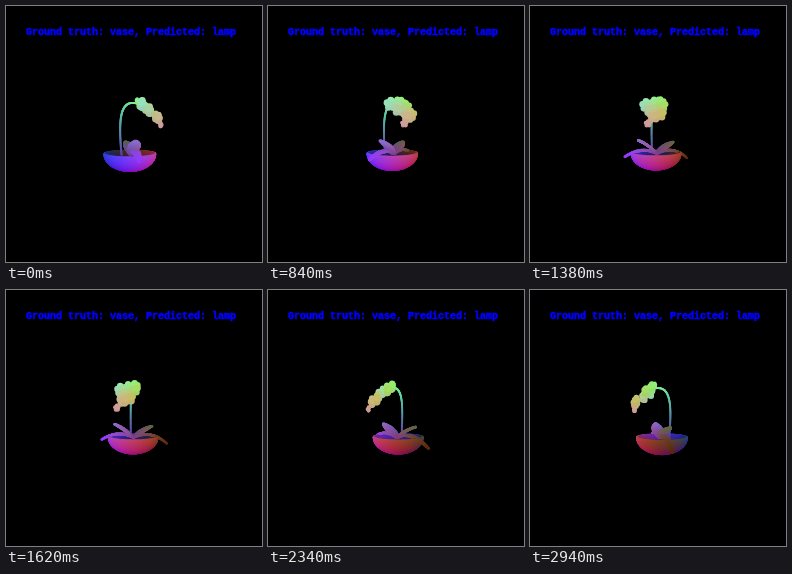
Write an HTML page with a canvas that moves like this. It is 256 px wide and 256 px high and loops after 3000 ms.

```html
<!DOCTYPE html>
<html lang="en">
<head>
<meta charset="utf-8">
<style>
html, body { margin: 0; width: 100%; height: 100%; overflow: hidden; background: #000; }
canvas { position: absolute; left: 0; top: 0; }
p {
  position: absolute; left: 20px; top: 21px; margin: 0; white-space: pre;
  font: bold 10px/12px "Liberation Mono", "Courier New", monospace;
  color: #00f; -webkit-text-stroke: 0.5px #00f;
}
</style>
</head>
<body>
<canvas id="stage" width="256" height="256"></canvas>
<p>Ground truth: vase, Predicted: lamp</p>
<script>
const ctx = document.getElementById('stage').getContext('2d');
const CENTER = 128, CAMERA = 140, STEP = 60, STEPS = 50;
const RAD = Math.PI / 180;
const dots = [];

// Model space: x right, z towards the viewer, y down the stage. Colour follows position.
function dot(x, y, z, r, shade = 1) {
  const channel = v => Math.round(255 * shade * Math.min(1, Math.max(0, v)));
  const red = 0.5 + 0.0118 * (x + 0.09 * z);
  const green = (166 - y) / 75;
  const blue = 0.52 + 0.0165 * (0.97 * z - 0.26 * x);
  dots.push({ x, y, z, r, fill: `rgb(${[red, green, blue].map(channel)})` });
}

function bezier(points, t) {
  while (points.length > 1) {
    points = points.slice(1).map((p, i) => p.map((v, k) => points[i][k] * (1 - t) + v * t));
  }
  return points[0];
}

function bowl(radius, depth, shade) {
  for (let t = 0; t <= 90; t += 2.5) {
    const r = radius * Math.cos(t * RAD);
    const n = Math.max(1, Math.ceil(r * 5.5));
    for (let i = 0; i < n; i++) {
      const a = i / n * 2 * Math.PI;
      dot(r * Math.cos(a) - 4, 147 + depth * Math.sin(t * RAD), r * Math.sin(a) + 1.4, 0.85, shade);
    }
  }
}

function stem() {
  const path = [[-12, 148, 5], [-15, 115, 6], [-14, 94, 5], [3, 98, 2]];
  for (let t = 0; t <= 1; t += 0.01) dot(...bezier(path, t), 1.1 - 0.1 * t);
}

function leaf(angle, reach, tipY, bendY, halfWidth) {
  const c = Math.cos(angle * RAD), s = Math.sin(angle * RAD);
  const path = [[-3, 148, 1], [reach * c * 0.5, bendY, reach * s * 0.5], [reach * c, tipY, reach * s]];
  for (let t = 0; t <= 1; t += 0.025) {
    const [x, y, z] = bezier(path, t);
    const w = halfWidth * Math.sin(Math.PI * (0.12 + 0.85 * t));
    for (let d = -w; d <= w; d += 0.8) dot(x - d * s, y, z + d * c, 1.25);
  }
}

// A blossom sits at distance out along the spray and side across it.
function blossom(out, side, y, size) {
  const c = Math.cos(25 * RAD), s = Math.sin(25 * RAD);
  const ball = (o, d, h, r) => dot(o * c + d * s, h, o * s - d * c, r);
  ball(out + 1, side, y, size * 0.5);
  for (let i = 0; i < 5; i++) {
    const a = (i * 72 - 90) * RAD;
    for (let k = 0.25; k <= 0.56; k += 0.15) {
      ball(out, side + size * k * Math.cos(a), y + size * k * Math.sin(a), size * 0.48);
    }
  }
}

bowl(24.9, 16.5, 1);
bowl(24, 15.5, 0.7);
stem();
leaf(86, 20, 134, 138, 5.2);
leaf(242, 20.5, 136.5, 139, 5);
leaf(83, 33, 150, 139, 3);
leaf(255, 35, 155, 139, 3);
[
  [3, 1, 95, 3.5], [5, 4, 98, 6], [9, -1, 99, 6], [12, -8, 101, 6.5], [10, 7, 102, 6],
  [17, -2, 106, 6.5], [20, 8, 111, 6], [24, 4, 113, 6], [27, 0, 119.5, 3.5]
].forEach(b => blossom(...b));

function draw(now) {
  const turn = Math.floor(now / STEP) % STEPS / STEPS * Math.PI;
  const c = Math.cos(turn), s = Math.sin(turn);
  ctx.fillStyle = '#000';
  ctx.fillRect(0, 0, 256, 256);
  for (const d of dots) d.depth = d.x * s + d.z * c;
  dots.sort((a, b) => a.depth - b.depth);
  for (const d of dots) {
    const scale = CAMERA / (CAMERA - d.depth);
    ctx.fillStyle = d.fill;
    ctx.beginPath();
    ctx.arc(CENTER + (d.x * c - d.z * s) * scale, CENTER + (d.y - CENTER) * scale, d.r * scale, 0, 7);
    ctx.fill();
  }
}

const start = performance.now();
let shown = -1;
function tick() {
  const now = performance.now() - start;
  const step = Math.floor(now / STEP);
  if (step !== shown) draw(now);
  shown = step;
  requestAnimationFrame(tick);
}
tick();
</script>
</body>
</html>
```
